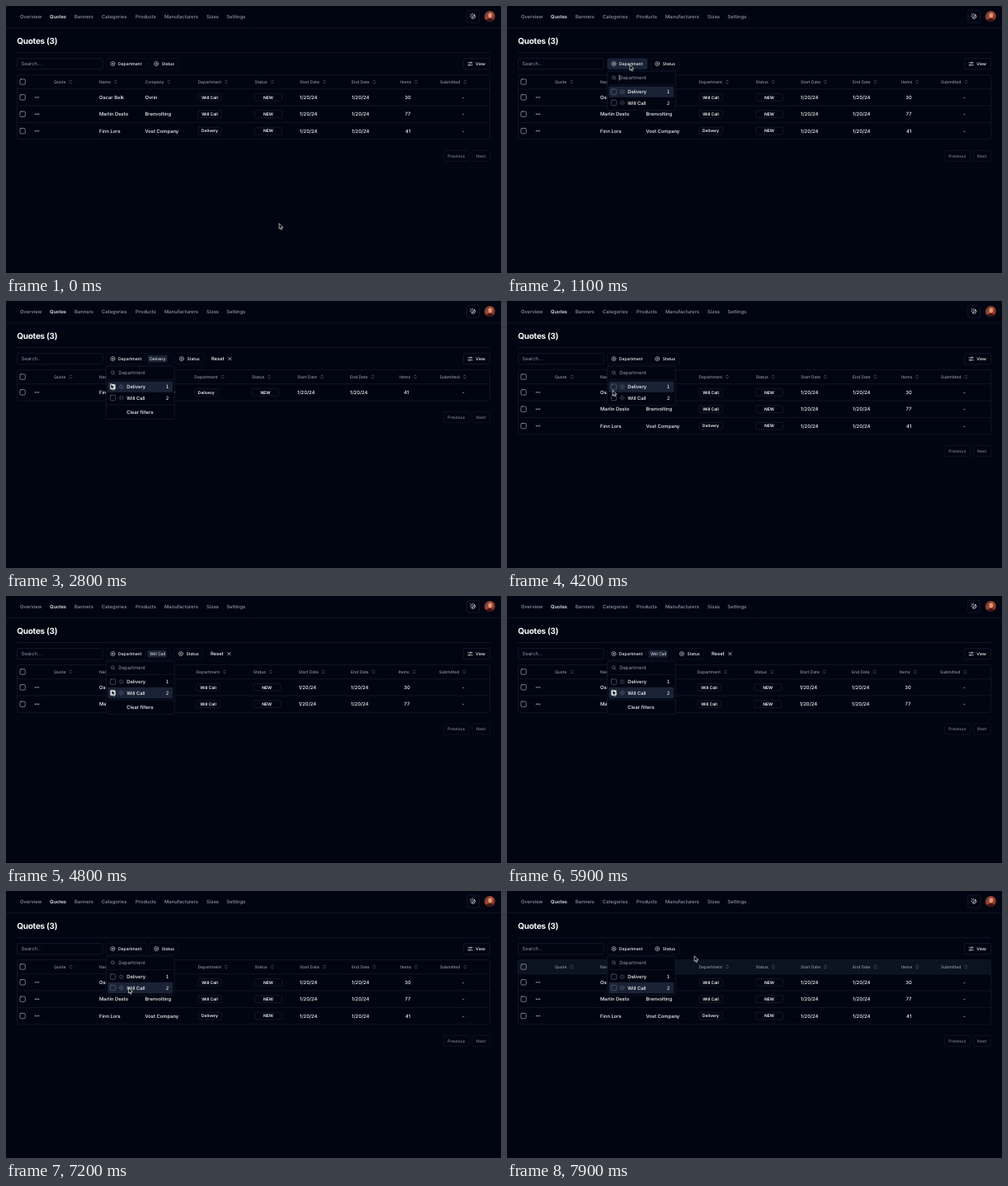
Animation, 600 px wide and 324 px high, one loop 8000 ms. Source, as an HTML page with a canvas:

```html
<!DOCTYPE html>
<html lang="en">
<head>
<meta charset="utf-8">
<title>Quotes table</title>
<style>
html, body { margin: 0; width: 100%; height: 100%; overflow: hidden; background: #010511; }
canvas { display: block; width: 600px; height: 324px; }
</style>
</head>
<body>
<canvas id="stage"></canvas>
<script>
const canvas = document.getElementById('stage');
const ctx = canvas.getContext('2d');
const ratio = window.devicePixelRatio || 1;
canvas.width = 600 * ratio;
canvas.height = 324 * ratio;

const LOOP = 8000, STEP = 100;
const SM = 5.83, XS = 5;
const C = {
  bg: '#010511', line: '#1a2435', dim: '#111a29', text: '#f8fafc', muted: '#8d97a8',
  accent: '#1a2335', hover: '#0c1320', faint: '#7a8494', check: '#b4bcc8'
};

const NAV = [['Overview', 17], ['Quotes', 53], ['Banners', 83], ['Categories', 116], ['Products', 157],
  ['Manufacturers', 192], ['Sizes', 243], ['Settings', 267.3]];

const ROWS = [
  { name: 'Oscar Belk', company: 'Ovrin', dept: 'Will Call', items: '30' },
  { name: 'Marlin Desto', company: 'Brenvolting', dept: 'Will Call', items: '77' },
  { name: 'Finn Lors', company: 'Vost Company', dept: 'Delivery', items: '41' }
];

// Column starts: company, department, status, start, end, items, submitted
const COLUMNS = {
  '': [168.5, 232.5, 301.5, 356, 419, 478, 526],
  'Delivery': [164.5, 228.3, 298, 353, 417, 477, 525.5],
  'Will Call': [166.5, 230.5, 299.7, 354.7, 418, 475.5, 525]
};
const TITLES = ['Company', 'Department', 'Status', 'Start Date', 'End Date', 'Items', 'Submitted'];

// Pointer path: time, x, y
const POINTER = [
  [0, 331, 264], [100, 275, 226], [300, 275, 226], [400, 163, 130], [500, 163, 130],
  [600, 150, 74], [1400, 148, 70], [1700, 140, 77], [2000, 134, 92.5], [2400, 131, 98],
  [2600, 127, 100.5], [4000, 127, 100.5], [4200, 128, 108.5], [4500, 128, 114], [6500, 128, 114],
  [6700, 129, 114.5], [7100, 129, 114.5], [7500, 207, 127], [7900, 227, 79]
];

function pointerAt(t) {
  let i = 0;
  while (i < POINTER.length - 2 && t >= POINTER[i + 1][0]) i++;
  const [t0, x0, y0] = POINTER[i], [t1, x1, y1] = POINTER[i + 1];
  const k = Math.min(1, (t - t0) / (t1 - t0));
  return [x0 + (x1 - x0) * k, y0 + (y1 - y0) * k];
}

// Row 0 is the table head
function hoveredRow(t) {
  if (t >= 7800) return 0;
  if (t >= 7600) return 1;
  if (t >= 7500 || (t >= 400 && t < 600)) return 2;
  return -1;
}

function stateAt(t) {
  const within = (a, b) => t >= a && t < b;
  return {
    filter: within(2800, 3900) ? 'Delivery' : within(4600, 6400) ? 'Will Call' : '',
    open: t >= 900,
    selected: within(4300, 6400) || t >= 7100 ? 1 : 0,
    buttonHover: within(600, 2600),
    hoverRow: hoveredRow(t),
    caret: within(900, 2700) && (t - 900) % 1000 < 500,
    pointer: pointerAt(t)
  };
}

function text(str, x, y, { size = SM, weight = 500, color = C.text, align = 'left', family = 'Inter, sans-serif', track = 0 } = {}) {
  ctx.font = `${weight} ${size}px ${family}`;
  ctx.textRendering = 'geometricPrecision';
  ctx.letterSpacing = `${track}px`;
  ctx.textAlign = align;
  ctx.textBaseline = 'alphabetic';
  ctx.fillStyle = color;
  ctx.fillText(str, x, y + size * 0.364);
}

function box(x, y, w, h, { r = 2, fill, stroke, dash = [], width = 0.6 } = {}) {
  ctx.beginPath();
  ctx.roundRect(x, y, w, h, r);
  if (fill) { ctx.fillStyle = fill; ctx.fill(); }
  if (stroke) {
    ctx.setLineDash(dash);
    ctx.lineWidth = width;
    ctx.strokeStyle = stroke;
    ctx.stroke();
    ctx.setLineDash([]);
  }
}

function lines(color, width, ...paths) {
  ctx.beginPath();
  for (const p of paths) {
    ctx.moveTo(p[0], p[1]);
    for (let i = 2; i < p.length; i += 2) ctx.lineTo(p[i], p[i + 1]);
  }
  ctx.lineCap = ctx.lineJoin = 'round';
  ctx.lineWidth = width;
  ctx.strokeStyle = color;
  ctx.stroke();
}

function ring(x, y, r, color, width = 0.6) {
  ctx.beginPath();
  ctx.arc(x, y, r, 0, Math.PI * 2);
  ctx.lineWidth = width;
  ctx.strokeStyle = color;
  ctx.stroke();
}

function blob(x, y, rx, ry, color) {
  ctx.beginPath();
  ctx.ellipse(x, y, rx, ry, 0, 0, Math.PI * 2);
  ctx.fillStyle = color;
  ctx.fill();
}

const rule = (x0, x1, y) => lines(C.line, 0.5, [x0, y, x1, y]);

function plusIcon(x, y) {
  ring(x, y, 2.6, C.text, 0.5);
  lines(C.text, 0.5, [x - 1.1, y, x + 1.1, y], [x, y - 1.1, x, y + 1.1]);
}

function sortIcon(x, y) {
  lines(C.muted, 0.5, [x - 1.2, y - 0.9, x, y - 2.1, x + 1.2, y - 0.9],
    [x - 1.2, y + 0.9, x, y + 2.1, x + 1.2, y + 0.9]);
}

function loaderIcon(x, y) {
  const spokes = [];
  for (let i = 0; i < 8; i++) {
    const c = Math.cos(i * Math.PI / 4), s = Math.sin(i * Math.PI / 4);
    spokes.push([x + c * 1.5, y + s * 1.5, x + c * 2.7, y + s * 2.7]);
  }
  lines(C.muted, 0.45, ...spokes);
}

function checkbox(x, y, color, checked) {
  box(x - 3.2, y - 3.2, 6.4, 6.4, { r: 1.3, stroke: color, fill: checked ? C.text : undefined });
  if (checked) lines('#0f172a', 0.7, [x - 1.7, y, x - 0.5, y + 1.3, x + 1.9, y - 1.4]);
}

function drawHeader() {
  for (const [label, x] of NAV) text(label, x, 12.5, { color: label === 'Quotes' ? C.text : C.muted });
  rule(0, 600, 26.3);

  box(558.6, 5.2, 15, 15, { r: 2.5, stroke: C.line });
  ctx.beginPath();
  ctx.arc(566, 12.5, 2.7, -0.9, 2.4);
  ctx.quadraticCurveTo(567.3, 13.8, 567.7, 10.4);
  ctx.strokeStyle = C.text;
  ctx.lineWidth = 0.75;
  ctx.stroke();
  lines(C.text, 0.7, [563, 9.5, 565.3, 11.6], [565.7, 9.2, 565.7, 10.1], [562.8, 12.3, 563.7, 12.3]);

  ctx.save();
  ctx.beginPath();
  ctx.arc(586.3, 12.6, 6.5, 0, Math.PI * 2);
  ctx.clip();
  const glow = ctx.createLinearGradient(580, 8, 593, 17);
  glow.addColorStop(0, '#5a3a36');
  glow.addColorStop(0.5, '#b4492f');
  glow.addColorStop(1, '#6b2a24');
  ctx.fillStyle = glow;
  ctx.fillRect(579, 5, 15, 15);
  blob(586.8, 11.3, 2.3, 2.9, '#d59a80');
  blob(586.3, 19, 5, 4, '#3a1519');
  ctx.restore();
}

function drawToolbar({ filter, buttonHover }) {
  text('Quotes (3)', 13.2, 42.7, { size: 10, weight: 700, track: -0.25 });
  rule(13.3, 586.7, 56.5);
  box(13.5, 63.6, 103.7, 13.2, { stroke: C.line });
  text('Search...', 18.6, 70.2, { weight: 400, color: C.muted });

  const shift = filter === 'Delivery' ? 30.7 : filter ? 29.7 : 0;
  const dashed = { stroke: C.dim, dash: [1.25, 0.8] };
  box(121.4, 63.6, 48.8 + shift, 13.2, { ...dashed, fill: buttonHover ? C.accent : undefined });
  plusIcon(129.5, 70.1);
  text('Department', 136, 70.1, { size: XS });
  if (filter) {
    lines(C.line, 0.5, [168.7, 67, 168.7, 73.5]);
    box(171.7, 65.8, shift - 6.8, 8.8, { r: 1.2, fill: C.accent });
    text(filter, 174.2, 70.1, { size: XS, weight: 400 });
  }

  box(174 + shift, 63.6, 35, 13.2, dashed);
  plusIcon(182.2 + shift, 70.1);
  text('Status', 188.8 + shift, 70.1, { size: XS });
  if (filter) {
    text('Reset', 218.2 + shift, 70.1);
    const x = 240.7 + shift;
    lines(C.text, 0.65, [x - 1.7, 68.4, x + 1.7, 71.8], [x + 1.7, 68.4, x - 1.7, 71.8]);
  }

  box(554.6, 63.6, 31.9, 13.2, { stroke: C.line });
  lines(C.text, 0.65, [560, 68.8, 562.6, 68.8], [564.2, 68.8, 565.3, 68.8], [563.4, 67.9, 563.4, 69.7],
    [560, 71.7, 560.9, 71.7], [562.5, 71.7, 565.3, 71.7], [561.7, 70.8, 561.7, 72.6]);
  text('View', 569.2, 70.1, { size: XS });
}

function drawTable({ filter, hoverRow }) {
  const rows = ROWS.filter(r => !filter || r.dept === filter);
  const cols = COLUMNS[filter];
  const top = 83.6, headBottom = 100.6, rowHeight = 20.4;
  const bottom = headBottom + rows.length * rowHeight;
  const head = (label, x) => {
    text(label, x, 92, { size: XS, color: C.muted });
    sortIcon(x + ctx.measureText(label).width + 6, 92);
  };

  if (hoverRow >= 0) {
    ctx.fillStyle = C.hover;
    if (hoverRow === 0) ctx.fillRect(13.5, top, 573, headBottom - top);
    else ctx.fillRect(13.5, headBottom + (hoverRow - 1) * rowHeight, 573, rowHeight);
  }
  box(13.5, top, 573, bottom - top, { r: 2.5, stroke: C.line, width: 0.5 });
  checkbox(20.1, 92, C.check);
  head('Quote', 58);
  head('Name', 113);
  TITLES.forEach((label, i) => head(label, cols[i]));

  rows.forEach((row, i) => {
    const y = headBottom + i * rowHeight + rowHeight / 2;
    rule(13.5, 586.5, y - rowHeight / 2);
    checkbox(20.1, y, C.check);
    for (const dx of [-2, 0, 2]) blob(37.6 + dx, y, 0.6, 0.6, C.text);
    text(row.name, 113, y);
    text(row.company, cols[0], y);
    box(cols[1] + 0.2, y - 4.4, 28.6, 8.8, { stroke: C.line });
    text(row.dept, cols[1] + 14.5, y, { size: XS, weight: 600, align: 'center' });
    box(cols[2] + 0.2, y - 4.4, 32.8, 8.8, { stroke: C.line });
    text('NEW', cols[2] + 16.5, y, { size: XS, weight: 600, align: 'center' });
    text('1/20/24', cols[3], y);
    text('1/20/24', cols[4], y);
    text(row.items, filter === 'Delivery' ? 485.3 : filter ? 486 : 487, y, { align: 'center' });
    text('-', 554.3, y, { align: 'center' });
  });

  const y = bottom + 20.1;
  box(530.3, y - 6.6, 31, 13.2, { stroke: C.dim });
  text('Previous', 545.7, y, { size: XS, color: C.faint, align: 'center' });
  box(565, y - 6.6, 21.5, 13.2, { stroke: C.dim });
  text('Next', 575.7, y, { size: XS, color: C.faint, align: 'center' });
}

function drawPopover({ filter, selected, caret }) {
  box(121.3, 79, 82.9, filter ? 64.4 : 47.7, { r: 2.5, fill: C.bg, stroke: C.line });
  ring(129.2, 86.7, 1.9, C.muted, 0.5);
  lines(C.muted, 0.5, [130.6, 88.1, 131.8, 89.3]);
  text('Department', 136.2, 87, { weight: 400, color: C.muted });
  if (caret) lines(C.text, 0.6, [136.2, 84, 136.2, 90]);
  rule(121.3, 204.2, 95.4);

  ['Delivery', 'Will Call'].forEach((label, i) => {
    const y = 104.1 + i * 13.4;
    if (i === selected) box(123.2, y - 6.7, 79, 13.4, { r: 1.4, fill: C.accent });
    checkbox(129.5, y, '#667183', label === filter);
    loaderIcon(139.7, y);
    text(label, 146.2, y);
    text(i + 1, 195.4, y, { size: SM, weight: 400, align: 'center', family: '"DejaVu Sans Mono", monospace' });
  });

  if (filter) {
    rule(121.3, 204.2, 126);
    text('Clear filters', 162.5, 134.6, { align: 'center' });
  }
}

function drawPointer([x, y]) {
  ctx.save();
  ctx.translate(x - 0.2, y);
  ctx.beginPath();
  ctx.moveTo(0.3, 0.2);
  for (const [px, py] of [[0.3, 6.3], [1.7, 5.1], [2.7, 7.5], [3.8, 7], [2.8, 4.8], [4.7, 4.7]]) ctx.lineTo(px, py);
  ctx.closePath();
  ctx.fillStyle = '#000';
  ctx.fill();
  ctx.lineWidth = 0.65;
  ctx.lineJoin = 'round';
  ctx.strokeStyle = '#fff';
  ctx.stroke();
  ctx.restore();
}

function draw(t) {
  const state = stateAt(Math.floor(t / STEP) * STEP);
  ctx.setTransform(ratio, 0, 0, ratio, 0, 0);
  ctx.fillStyle = C.bg;
  ctx.fillRect(0, 0, 600, 324);
  drawHeader();
  drawToolbar(state);
  drawTable(state);
  if (state.open) drawPopover(state);
  drawPointer(state.pointer);
}

const start = performance.now();
function tick() {
  draw((performance.now() - start) % LOOP);
  requestAnimationFrame(tick);
}
tick();
</script>
</body>
</html>
```
